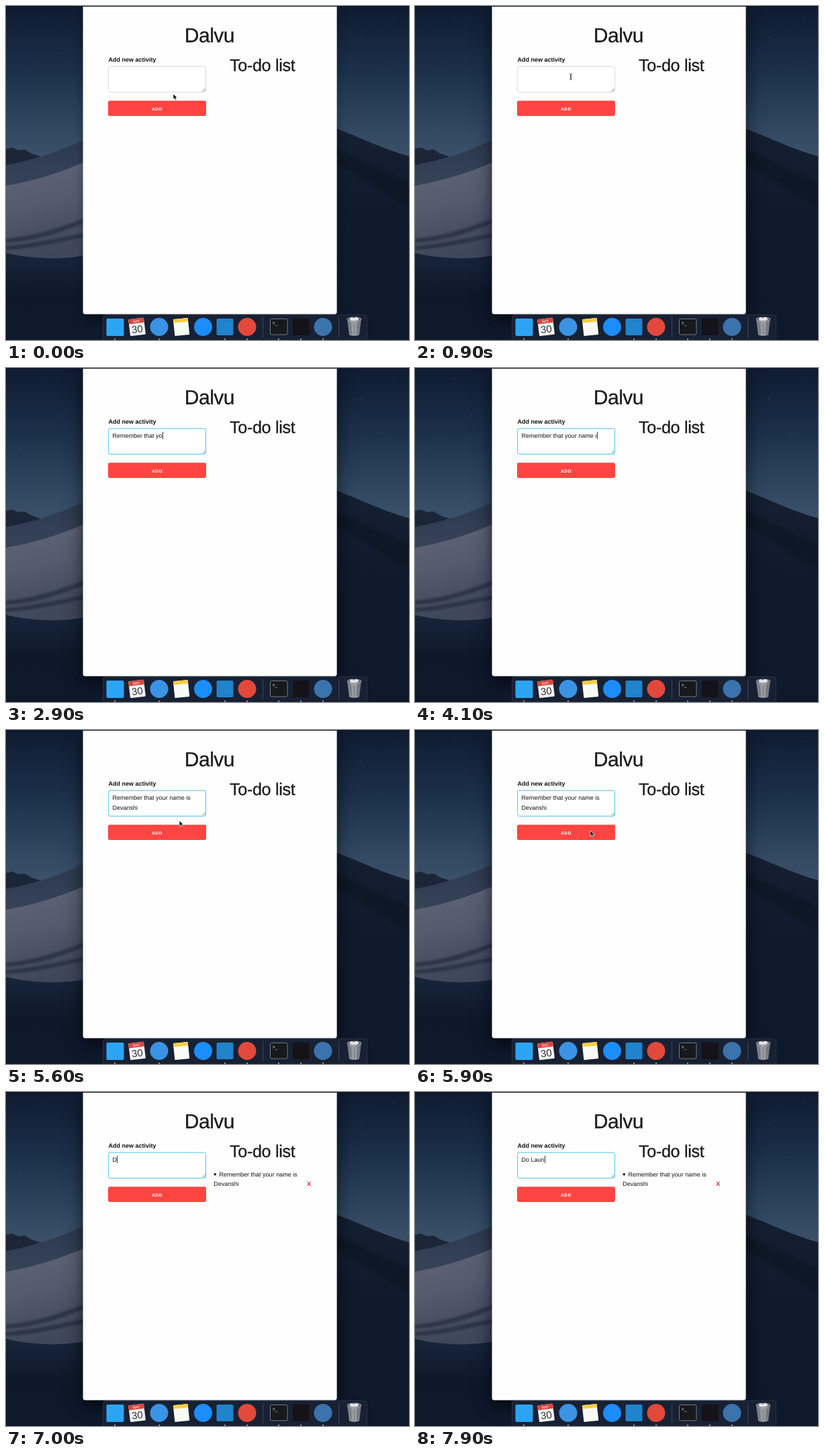
Recreate the animation shown at these times as an HTML page. Size 600x498 px, loop 8000 ms.

```html
<!DOCTYPE html>
<html lang="en">
<head>
<meta charset="utf-8">
<title>To-do list</title>
<style>
html, body { margin: 0; width: 100%; height: 100%; overflow: hidden; background: #0e1729; }
svg { position: absolute; left: 0; top: 0; display: block; }
text, #field { font-family: "Liberation Sans", Arial, sans-serif; text-rendering: geometricPrecision; fill: #1c1c1c; }
.head { stroke: #1c1c1c; stroke-width: .3px; }
.body { font-size: 9px; fill: #111; }
.bold { font-weight: 700; }
#field {
  position: absolute; left: 158.6px; top: 94.2px; width: 132.4px;
  font-size: 9px; line-height: 14.4px; color: #111; white-space: pre-wrap;
}
#caret {
  display: inline-block; width: 1px; height: 11px; margin-left: .4px; margin-right: -1.4px;
  vertical-align: -2px; background: #333;
}
</style>
</head>
<body>
<svg width="600" height="498" viewBox="0 0 600 498">
  <defs>
    <linearGradient id="sky" x2="0" y2="1">
      <stop offset="0" stop-color="#0f1b30"/>
      <stop offset=".4" stop-color="#1c314c"/>
      <stop offset=".75" stop-color="#324963"/>
      <stop offset="1" stop-color="#43566d"/>
    </linearGradient>
    <linearGradient id="dune" x2="0" y2="1">
      <stop offset="0" stop-color="#2c394f"/>
      <stop offset=".35" stop-color="#364258"/>
      <stop offset="1" stop-color="#474f63"/>
    </linearGradient>
    <linearGradient id="fold" x1="0" y1="0" x2=".2" y2="1">
      <stop offset="0" stop-color="#5f6679"/>
      <stop offset=".5" stop-color="#545b6f"/>
      <stop offset="1" stop-color="#3f475b"/>
    </linearGradient>
    <linearGradient id="base" x2="0" y2="1">
      <stop offset="0" stop-color="#17253b"/>
      <stop offset=".5" stop-color="#0e182a"/>
      <stop offset="1" stop-color="#0f192c"/>
    </linearGradient>
    <linearGradient id="night" x2="0" y2="1">
      <stop offset="0" stop-color="#152033"/>
      <stop offset=".4" stop-color="#101a2d"/>
      <stop offset="1" stop-color="#0f192c"/>
    </linearGradient>
    <linearGradient id="bin" x2="1" y2="0">
      <stop offset="0" stop-color="#6f747c"/>
      <stop offset=".5" stop-color="#a4a8ad"/>
      <stop offset="1" stop-color="#62676f"/>
    </linearGradient>
    <filter id="blur" x="-20%" y="-20%" width="140%" height="140%"><feGaussianBlur stdDeviation="8"/></filter>
    <filter id="wide" x="-20%" y="-20%" width="140%" height="140%"><feGaussianBlur stdDeviation="16"/></filter>
    <filter id="soft" x="-10%" y="-30%" width="120%" height="160%"><feGaussianBlur stdDeviation="1.500"/></filter>
  </defs>

  <!-- desktop -->
  <rect width="600" height="250" fill="url(#sky)"/>
  <g fill="#8fa3c0" opacity=".6">
    <circle cx="58" cy="15" r=".6"/><circle cx="21" cy="123" r=".6"/><circle cx="84" cy="70" r=".5"/>
    <circle cx="578" cy="16" r=".6"/><circle cx="527" cy="47" r=".6"/><circle cx="558" cy="97" r=".6"/>
  </g>
  <path d="M0 213L9 211 18 215 28 214 38 220 50 224 60 232 0 240Z" fill="#1b2739"/>
  <path d="M0 237C42 230 80 216 120 198V380H0Z" fill="url(#dune)"/>
  <path d="M0 268C45 260 85 247 120 231V372L60 377 0 370Z" fill="url(#fold)"/>
  <g filter="url(#soft)" fill="#262f43" opacity=".8">
    <path d="M0 347C45 343 80 330 120 316V322C85 336 50 350 0 353Z"/>
    <path d="M0 358C45 354 80 345 120 338V344C85 350 50 361 0 364Z"/>
  </g>
  <path d="M0 368C30 376 80 380 120 371L600 375V498H0Z" fill="url(#base)"/>
  <path d="M485 180C520 193 560 213 600 224V498H485Z" fill="url(#night)"/>
  <path d="M485 212C525 226 560 248 600 262V300C560 280 525 250 485 232Z" fill="#0c1422" opacity=".7" filter="url(#soft)"/>

  <!-- window -->
  <rect id="glow" x="115" y="14" width="377" height="452" rx="6" opacity=".4" filter="url(#wide)"/>
  <rect x="117" y="8" width="373" height="456" rx="6" opacity=".5" filter="url(#blur)"/>
  <rect width="600" height="1" fill="#0c1525"/>
  <path d="M114.600 1H492.600V456a3.500 3.500 0 0 1-3.500 3.500H118.100a3.500 3.500 0 0 1-3.500-3.500Z" fill="#fefefe"/>
  <text class="head" x="265.800" y="53.700" font-size="30" letter-spacing="-.5">Dalvu</text>
  <text class="head" x="333" y="97" font-size="25.200" letter-spacing="-.35">To-do list</text>
  <text class="body bold" x="152.400" y="83.200">Add new activity</text>
  <rect id="box" x="152.700" y="90.200" width="144.800" height="38.200" rx="2.400" fill="#fff"/>
  <path d="M292.500 127.200l4-4M294.800 127.200l1.700-1.700" stroke="#555" stroke-width=".7"/>
  <g id="sel" fill="#b3d7fe">
    <rect x="158.600" y="94.200" width="132.600" height="14.400"/>
    <rect x="158.600" y="108.600" width="37.600" height="14"/>
  </g>
  <rect x="152" y="141.200" width="146" height="22.800" rx="2.400" fill="#ff4542"/>
  <text class="bold" x="217" y="155.700" font-size="6.600" letter-spacing=".6" style="fill:#fff">ADD</text>
  <g id="item">
    <circle cx="311.300" cy="122.800" r="1.800" fill="#111"/>
    <text class="body" x="317.600" y="125.500">Remember that your name is</text>
    <text class="body" x="309.200" y="139.800">Devanshi</text>
    <text class="body bold" x="448.300" y="140.200" style="fill:#d62a2a">X</text>
  </g>

  <!-- dock -->
  <rect x="144.500" y="460.500" width="393" height="40" rx="3" fill="#182133" stroke="#273145"/>
  <path d="M382.500 464V494M495.500 464V494" stroke="#3d475a"/>
  <rect x="149.500" y="466" width="26" height="26" rx="2" fill="#2ba5f3"/>
  <g transform="rotate(-7 195 478)">
    <rect x="183.500" y="466" width="23" height="25" rx="1.500" fill="#f4f4f4"/>
    <path d="M183.500 473V467.500a1.500 1.500 0 0 1 1.500-1.500H205a1.500 1.500 0 0 1 1.500 1.500V473Z" fill="#d8473f"/>
    <text x="195" y="471.700" font-size="5" text-anchor="middle" style="fill:#fff">MAY</text>
    <text x="195" y="487" font-size="15" text-anchor="middle" style="fill:#333">30</text>
  </g>
  <circle cx="228" cy="478.500" r="13.500" fill="#3a93e4"/>
  <g transform="rotate(-6 261 478)">
    <rect x="250" y="466" width="22" height="25" rx="1" fill="#fafaf5"/>
    <rect x="250" y="466" width="22" height="5.500" rx="1" fill="#f8cd45"/>
  </g>
  <circle cx="293.500" cy="478.500" r="13.500" fill="#1c8dfc"/>
  <rect x="313.500" y="466" width="25" height="25" rx="2" fill="#2083cc"/>
  <circle cx="359" cy="478.500" r="13.500" fill="#e2493c"/>
  <rect x="393.500" y="466.500" width="25.500" height="23.500" rx="2" fill="#17191c" stroke="#75797f"/>
  <text x="396.500" y="475" font-size="7" style="fill:#eee">&gt;_</text>
  <rect x="427" y="466" width="24.500" height="25" rx="1" fill="#15121a"/>
  <circle cx="472" cy="478.500" r="13.500" fill="#3b73ad"/>
  <path d="M508 467L511 490.500Q518.500 493 526 490.500L529 467Z" fill="url(#bin)"/>
  <ellipse cx="518.500" cy="467" rx="10.500" ry="2.800" fill="#4a4f56" stroke="#c3c7cb" stroke-width=".8"/>
  <path d="M511 467l3-3 4 1.500 4-2 4 3.500-4 2h-8Z" fill="#e4e6e8"/>
  <path d="M512.500 473l1.500 16M518.500 473v17M524.500 473l-1.500 16" stroke="#555a62" stroke-width=".7"/>
  <g id="dots" fill="#b9c2d0"></g>
</svg>

<div id="field"><span id="typed"></span><span id="caret"></span></div>

<svg width="600" height="498" viewBox="0 0 600 498" fill="none">
  <path id="arrow" d="M0 0V8.200L1.900 6.500 3.200 9.300 4.700 8.600 3.500 5.900H6Z" fill="#000" stroke="#fff" stroke-width=".7"/>
  <path id="beam" d="M-2-4.500Q0-4.500 0-3.500V3.500Q0 4.500-2 4.500M2-4.500Q0-4.500 0-3.500V3.500Q0 4.500 2 4.500M-1 .8H1" stroke="#222" stroke-width=".75"/>
</svg>

<script>
const LOOP = 8000, STEP = 100;
const NOTE = "Remember that your name is Devanshi";
const NEXT = "Do Laun";
const nextKeys = [7000, 7100, 7200, 7400, 7500, 7600, 7800];
const typing = [[1200, 0], [2900, 16], [4100, 25], [5100, NOTE.length]];
const pointer = [
  [0, 249, 131], [200, 248, 129], [600, 237, 110], [900, 232, 105.5], [5300, 232, 105.5],
  [5600, 258, 135], [5900, 261, 150], [6000, 261, 150], [6300, 246, 119]
];
const $ = id => document.getElementById(id);
const within = (t, a, b) => t >= a && t < b;
const show = (id, on) => { $(id).style.visibility = on ? "visible" : "hidden"; };

// Linear value of column c in a list of [time, ...values]
function track(keys, t, c) {
  if (t <= keys[0][0]) return keys[0][c];
  for (let i = 1; i < keys.length; i++) {
    const a = keys[i - 1], b = keys[i];
    if (t <= b[0]) return a[c] + (b[c] - a[c]) * (t - a[0]) / (b[0] - a[0]);
  }
  return keys[keys.length - 1][c];
}

function fieldText(t) {
  if (t < 6900) return NOTE.slice(0, Math.floor(track(typing, t, 1) + 1e-6));
  return NEXT.slice(0, nextKeys.filter(k => k <= t).length);
}

function draw(t) {
  const focus = within(t, 1000, 6000) || t >= 6300;
  const selected = within(t, 6600, 6900);
  $("box").setAttribute("stroke", focus ? "#4cc3ee" : "#d1d1d1");
  $("box").setAttribute("stroke-width", focus ? 1 : .8);
  $("typed").textContent = fieldText(t);
  show("glow", t >= 100);
  show("sel", selected);
  show("caret", focus && !selected && !within(t, 5600, 6000));
  show("item", t >= 6000);

  const x = track(pointer, t, 1), y = track(pointer, t, 2);
  const moving = t < 1300 || within(t, 5400, 6600);
  const inBox = within(x, 152, 298) && within(y, 90, 128);
  show("arrow", moving && !inBox);
  show("beam", moving && inBox);
  for (const id of ["arrow", "beam"]) $(id).setAttribute("transform", `translate(${x} ${y})`);
}

$("dots").innerHTML = [162, 228, 326, 359, 406, 439, 472]
  .map(x => `<circle cx="${x}" cy="496.700" r="1"/>`).join("");

const start = performance.now();
function tick() {
  const t = (performance.now() - start) % LOOP;
  draw(Math.floor(t / STEP) * STEP);
  requestAnimationFrame(tick);
}
tick();
</script>
</body>
</html>
```
